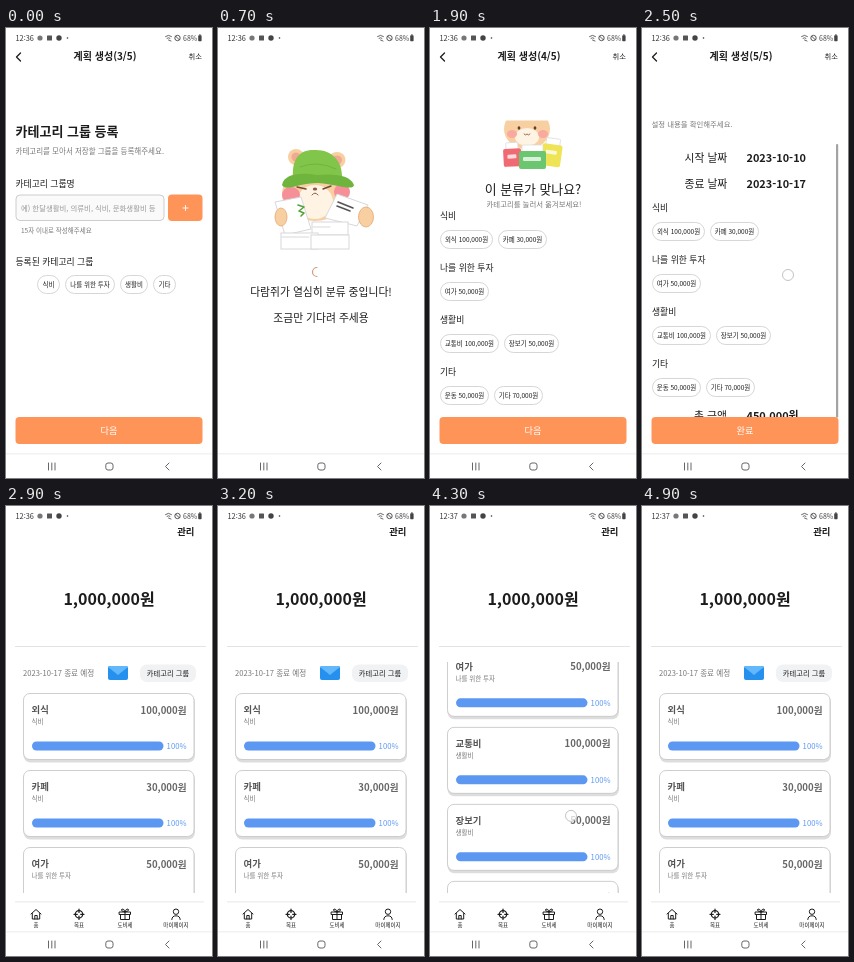
Animation, 206 px wide and 450 px high, one loop 5 s. Source, as an HTML page:

```html
<!DOCTYPE html>
<html lang="ko">
<head>
<meta charset="utf-8">
<style>
  html, body { margin: 0; height: 100%; overflow: hidden; background: #fff; }
  svg { display: block; width: 100vw; height: 100vh; }
  text { font-family: "Noto Sans CJK KR", "Noto Sans CJK", "Noto Sans CJK JP", sans-serif; white-space: pre; }
</style>
</head>
<body>
<svg id="stage" viewBox="0 0 206 450"></svg>
<script>
const INK = '#1c1c1c', GRAY = '#777', ORANGE = '#ff9459', BLUE = '#5c98f2';
const LINE = 'fill="none" stroke-linecap="round" stroke-linejoin="round"';

// y is the visual middle of the line of text
const text = (x, y, size, str, { fill = INK, weight = 400, anchor = 'start', id = '' } = {}) =>
  `<text x="${x}" y="${y + size * .37}" font-size="${size}" fill="${fill}" font-weight="${weight}" text-anchor="${anchor}" id="${id}">${str}</text>`;
const rect = (x, y, w, h, r, fill, extra = '') =>
  `<rect x="${x}" y="${y}" width="${w}" height="${h}" rx="${r}" fill="${fill}" ${extra}/>`;
const oval = (x, y, rx, ry, fill, extra = '') =>
  `<ellipse cx="${x}" cy="${y}" rx="${rx}" ry="${ry}" fill="${fill}" ${extra}/>`;
const path = (d, color = INK, width = 1) =>
  `<path d="${d}" ${LINE} stroke="${color}" stroke-width="${width}"/>`;
const shape = (d, fill, stroke = 'none') => `<path d="${d}" fill="${fill}" stroke="${stroke}"/>`;
const page = (id, body) => `<g id="${id}">${body}</g>`;
const scroller = (id, clip, body) => `<g clip-path="url(#${clip})"><g id="${id}">${body}</g></g>`;

const header = step => path('M14.5 25 L10.5 29 L14.5 33', INK, 1.3)
  + text(99, 28.5, 10, `계획 생성(${step}/5)`, { weight: 700, anchor: 'middle' })
  + text(182.5, 28.5, 7.3, '취소');
const button = (id, label) => `<g id="${id}">` + rect(9.5, 389, 187, 27, 4, ORANGE)
  + text(103, 402.5, 9.2, label, { fill: '#fff', anchor: 'middle' }) + '</g>';
const chip = (x, y, w, label) => rect(x + .5, y + .5, w - 1, 18, 9, '#fff', 'stroke="#ccc" stroke-width=".8"')
  + text(x + w / 2, y + 9.5, 6.5, label, { anchor: 'middle' });

const groups = [
  ['식비', ['외식 100,000원', 53], ['카페 30,000원', 49]],
  ['나를 위한 투자', ['여가 50,000원', 49]],
  ['생활비', ['교통비 100,000원', 59], ['장보기 50,000원', 55]],
  ['기타', ['운동 50,000원', 49], ['기타 70,000원', 49]]
];
const groupList = top => groups.map(([name, ...items], i) => {
  const y = top + i * 52;
  let x = 10;
  return text(10, y, 8.8, name, { weight: 500 }) + items.map(([label, w]) => {
    const out = chip(x, y + 14, w, label);
    x += w + 5;
    return out;
  }).join('');
}).join('');

const statusBar = text(9.5, 10, 7.4, '12:36', { id: 'clock', fill: '#333' })
  + oval(34, 10, 2.6, 2.6, '#777') + rect(41, 7.6, 5, 5, .5, '#555') + oval(53, 10, 2.7, 2.7, '#444')
  + oval(61.5, 10, .8, .8, '#333')
  + path('M159.5 8.5 Q162.5 6 165.5 8.5 M161 10.3 Q162.5 9 164 10.3 M162.5 12 L165 13', '#555', .9)
  + oval(171.5, 10, 2.7, 2.7, 'none', 'stroke="#444" stroke-width=".9"') + path('M169.7 8.2 L173.3 11.8', '#444', .9)
  + text(177, 10, 7, '68%', { fill: '#444' }) + rect(192.2, 7.2, 3.4, 6, .7, '#444') + rect(193.1, 6.4, 1.6, 1, 0, '#444');

const navBar = rect(0, 425.5, 206, .8, 0, '#e6e6e6')
  + path('M42.5 435 V442 M45.8 435 V442 M49 435 V442', '#666', 1)
  + rect(99.8, 435, 7.2, 7, 2.2, 'none', 'stroke="#666" stroke-width="1"')
  + path('M163 435 L159.5 438.5 L163 442', '#666', 1);

const registerPage = header(3)
  + text(9.5, 103, 13, '카테고리 그룹 등록', { weight: 700 })
  + text(9.5, 123, 7.5, '카테고리를 모아서 저장할 그룹을 등록해주세요.', { fill: GRAY })
  + text(9.5, 156, 8.8, '카테고리 그룹명', { weight: 500 })
  + rect(10, 167, 148, 25.5, 4, '#fafafa', 'stroke="#c8c8c8" stroke-width=".9"')
  + text(15, 180, 7.4, '예) 한달생활비, 의류비, 식비, 문화생활비 등', { fill: '#999' })
  + rect(162, 166.5, 34.5, 26.5, 4, ORANGE) + path('M177 180 H182 M179.5 177.5 V182.5', '#fff', .9)
  + text(15, 202.5, 6.5, '15자 이내로 작성해주세요', { fill: GRAY })
  + text(9.5, 234, 8.8, '등록된 카테고리 그룹', { weight: 500 })
  + chip(31, 247, 23, '식비') + chip(59, 247, 50, '나를 위한 투자')
  + chip(114, 247, 28, '생활비') + chip(147, 247, 23, '기타') + button('next3', '다음');

const PAPER = '#d8d8dc', FUR = '#f8cfa0';
const sorter = oval(78, 129, 8, 8, FUR) + oval(78, 129, 4.5, 4.5, '#f3a894')
  + oval(119, 132, 8.5, 8, FUR) + oval(119, 132, 5, 4.5, '#f3a894')
  + oval(97, 166, 33, 27, FUR) + oval(97, 174, 18, 17, '#fff3e4')
  + oval(73, 167, 9, 8, '#f58f98') + oval(124, 164, 8, 8, '#f58f98')
  + path('M79 159 L88 161 M105 161 L113 158', '#6d4a39', 1.4)
  + oval(97, 161, 2.2, 1.6, '#8a5b45') + path('M94 167 Q97 163 100 167', '#8a5b45', 1)
  + shape('M75 148 C74 127 85 121 98 122 C114 122 124 133 124 148 Z', '#82c54b')
  + shape('M64 157 C66 146 82 144 99 147 C119 145 133 148 136 157 C135 163 121 157 100 155 C80 155 68 164 64 157 Z', '#6fb53d')
  + path('M82 139 Q99 132 118 141', '#6fb53d', 1)
  + shape('M57 174 L83 169 L93 201 L67 207 Z', '#fff', PAPER)
  + shape('M119 166 L150 177 L139 198 L107 190 Z', '#fff', PAPER)
  + path('M80 177 L86 179 L81 183 L86 185 L83 188', '#55a33a', 1.6)
  + path('M120 174 L135 180 M119 178 L132 183', '#555', 1.6)
  + oval(63, 189, 6, 9, FUR, 'stroke="#e3a873" stroke-width=".8"')
  + oval(148, 189, 7.5, 10, FUR, 'stroke="#e3a873" stroke-width=".8"')
  + rect(94, 194, 36, 13, 0, '#fff', `stroke="${PAPER}"`)
  + rect(63, 205, 37, 16, 0, '#fff', `stroke="${PAPER}"`) + rect(93, 207, 38, 14, 0, '#fff', `stroke="${PAPER}"`)
  + path('M64 209 H91 M95 199 H112', PAPER, 1);

const loadingPage = sorter + `<g id="spinner">${path('M99 248.5 A4.5 4.5 0 0 1 99 239.5', '#d39a78', 1.2)}</g>`
  + text(103, 264, 10.8, '다람쥐가 열심히 분류 중입니다!', { weight: 500, anchor: 'middle' })
  + text(103, 290, 10.8, '조금만 기다려 주세용', { weight: 500, anchor: 'middle' });

const folder = (x, y, w, h, fill, turn) => `<g transform="rotate(${turn} ${x} ${y})">`
  + rect(x + 3, y - 6, w - 6, 10, 1, '#fff', `stroke="${PAPER}" stroke-width=".7"`)
  + rect(x, y, w, h, 2, fill) + rect(x + 4, y + 6, w - 9, 4, 1, '#fff', 'opacity=".75"') + '</g>';
const helper = oval(84, 84, 6, 6, FUR) + oval(111, 84, 6, 6, FUR)
  + oval(97, 101, 23, 20, FUR) + oval(97, 109, 12, 9, '#fff3e4')
  + oval(82, 106, 5, 4, '#f9a99f') + oval(113, 106, 5, 4, '#f9a99f')
  + oval(89, 100, 1.4, 1.7, '#5a4035') + oval(105, 100, 1.4, 1.7, '#5a4035')
  + path('M94 106 Q95.5 108 97 106 Q98.5 108 100 106', '#8a5b45', .9)
  + folder(73, 121, 18, 18, '#ef6a72', -3) + folder(113, 115, 20, 22, '#eee456', 8)
  + folder(89, 123, 27, 18, '#6cc56f', 0);

const checkPage = header(4) + scroller('scroll4', 'planClip', helper
  + text(103, 161, 12.9, '이 분류가 맞나요?', { weight: 500, anchor: 'middle' })
  + text(104, 176.5, 7.4, '카테고리를 눌러서 옮겨보세요!', { fill: GRAY, anchor: 'middle' })
  + groupList(188)) + button('next4', '다음');

const pair = (x, y, label, value) => text(x, y, 10.8, label, { weight: 500 })
  + text(104.5, y, 10.9, value, { weight: 700 });
const confirmPage = header(5) + scroller('scroll5', 'planClip',
  text(9.5, 96, 7.4, '설정 내용을 확인해주세요.', { fill: GRAY })
  + pair(42.5, 130, '시작 날짜', '2023-10-10') + pair(42.5, 156, '종료 날짜', '2023-10-17')
  + groupList(180) + pair(52, 388, '총 금액', '450,000원'))
  + `<g clip-path="url(#planClip)">${rect(194, 92, 2.2, 290, 1, '#a3a3a3', 'id="thumb"')}</g>` + button('done', '완료');

const card = ([name, group, amount], i) => {
  const y = 187 + i * 77;
  return rect(17.5, y + 2, 171.5, 67.5, 7, '#ddd') + rect(17.5, y + .5, 170.5, 66, 6.5, '#fff', 'stroke="#c9c9c9" stroke-width=".9"')
    + text(25.5, y + 17, 9.4, name, { weight: 700, fill: '#555' })
    + text(25.5, y + 28.5, 6.5, group, { fill: GRAY })
    + text(180.5, y + 17, 9.6, amount + '원', { weight: 700, fill: '#666', anchor: 'end' })
    + rect(26, y + 48.5, 131.5, 9, 4.5, BLUE)
    + text(180.5, y + 53, 7.7, '100%', { fill: BLUE, anchor: 'end' });
};
const cards = [
  ['외식', '식비', '100,000'], ['카페', '식비', '30,000'], ['여가', '나를 위한 투자', '50,000'],
  ['교통비', '생활비', '100,000'], ['장보기', '생활비', '50,000'], ['운동', '기타', '50,000'], ['기타', '기타', '70,000']
];
const envelope = rect(102, 160, 20, 14, 2, '#2590ee') + shape('M102 161 L112 169 L122 161 L121 160 H103 Z', '#62b8fa');
const tabs = [[30, '홈'], [73, '목표'], [119, '도비세'], [170, '마이페이지']]
  .map(([x, label]) => text(x, 419, 5.5, label, { anchor: 'middle', weight: 500 })).join('');
const tabIcons = path('M25 408 L30 403.5 L35 408 M26.3 407.5 V413 H33.7 V407.5 M28.8 413 V409.5 H31.2 V413')
  + oval(73, 408.3, 3.7, 3.7, 'none', `stroke="${INK}" stroke-width="1.2"`)
  + path('M73 403 V406.5 M73 410 V413.5 M68 408.3 H71.3 M74.7 408.3 H78', INK, 1.2)
  + path('M113.5 406 H124.5 V408.5 H113.5 Z M114.5 408.5 V413.5 H123.5 V408.5 M119 406 V413.5 M119 406 Q114 405 116 403 Q118 402.5 119 406 Q120 402.5 122 403 Q124 405 119 406')
  + oval(170, 405.7, 2.7, 2.7, 'none', `stroke="${INK}"`) + path('M165.8 413.5 Q166 409.8 170 409.8 Q174 409.8 174.2 413.5');

const managePage = text(188.5, 25.5, 9.4, '관리', { weight: 700, anchor: 'end' })
  + text(103, 93.5, 16, '1,000,000원', { weight: 700, anchor: 'middle' })
  + rect(9, 140, 191, .8, 0, '#ddd')
  + scroller('scrollCards', 'cardClip', text(17, 167.5, 7.6, '2023-10-17 종료 예정', { fill: GRAY }) + envelope
    + rect(134, 158.5, 56, 17.5, 7, '#f0f2f4') + text(162, 167, 7.3, '카테고리 그룹', { weight: 500, anchor: 'middle' })
    + cards.map(card).join(''))
  + rect(9, 395.5, 189, .8, 0, '#e2e2e2') + tabIcons + tabs;

document.getElementById('stage').innerHTML =
  '<defs><clipPath id="planClip"><rect y="92.5" width="206" height="297"/></clipPath>'
  + '<clipPath id="cardClip"><rect y="156" width="206" height="231"/></clipPath></defs>'
  + page('register', registerPage) + page('loading', loadingPage) + page('check', checkPage)
  + page('confirm', confirmPage) + page('manage', managePage) + statusBar + navBar
  + oval(0, 0, 5.5, 5.5, '#fff', 'id="finger" fill-opacity=".75" stroke="#bbb" stroke-width=".9"');

const el = id => document.getElementById(id);
const ramp = (t, from, to) => Math.min(1, Math.max(0, (t - from) / (to - from)));
const within = (t, from, to) => t >= from && t < to;
const show = (id, on) => el(id).setAttribute('visibility', on ? 'visible' : 'hidden');
const move = (id, x, y) => el(id).setAttribute('transform', `translate(${x} ${y})`);
const starts = { register: 0, loading: 400, check: 1100, confirm: 2200, manage: 2900 };
const presses = { next3: 200, next4: 2000, done: 2800 };

function draw(t) {
  const names = Object.keys(starts);
  names.forEach((name, i) => show(name, within(t, starts[name], starts[names[i + 1]] ?? 5000)));
  for (const id in presses) el(id).setAttribute('opacity', within(t, presses[id], presses[id] + 200) ? .6 : 1);
  el('spinner').setAttribute('transform', `rotate(${(t - 700) * .9} 99 244)`);
  el('clock').textContent = t < 4000 ? '12:36' : '12:37';

  const s4 = 40 * ramp(t, 1400, 1800);
  const s5 = 45 * ramp(t, 2300, 2633);
  const down = 335 * ramp(t, 3500, 3900);
  const sc = down - 335 * ramp(t, 4100, 4586);
  move('scroll4', 0, 40 - s4);
  move('scroll5', 0, 27 - s5);
  move('scrollCards', 0, -sc);
  move('thumb', 0, s5 * .89);
  show('thumb', within(t, 2300, 2800));

  const drags = [
    [1400, 1700, 146, 290 - s4], [2300, 2700, 146, 274 - s5],
    [3500, 3800, 146, 350 - sc], [4100, 4400, 141, 507 - sc]
  ];
  const drag = drags.find(([from, to]) => within(t, from, to));
  show('finger', drag);
  if (drag) move('finger', drag[2], drag[3]);
}

const begin = performance.now();
function tick() {
  const t = (performance.now() - begin) % 5000;
  draw(Math.floor(t / 100) * 100);
  requestAnimationFrame(tick);
}
tick();
</script>
</body>
</html>
```
